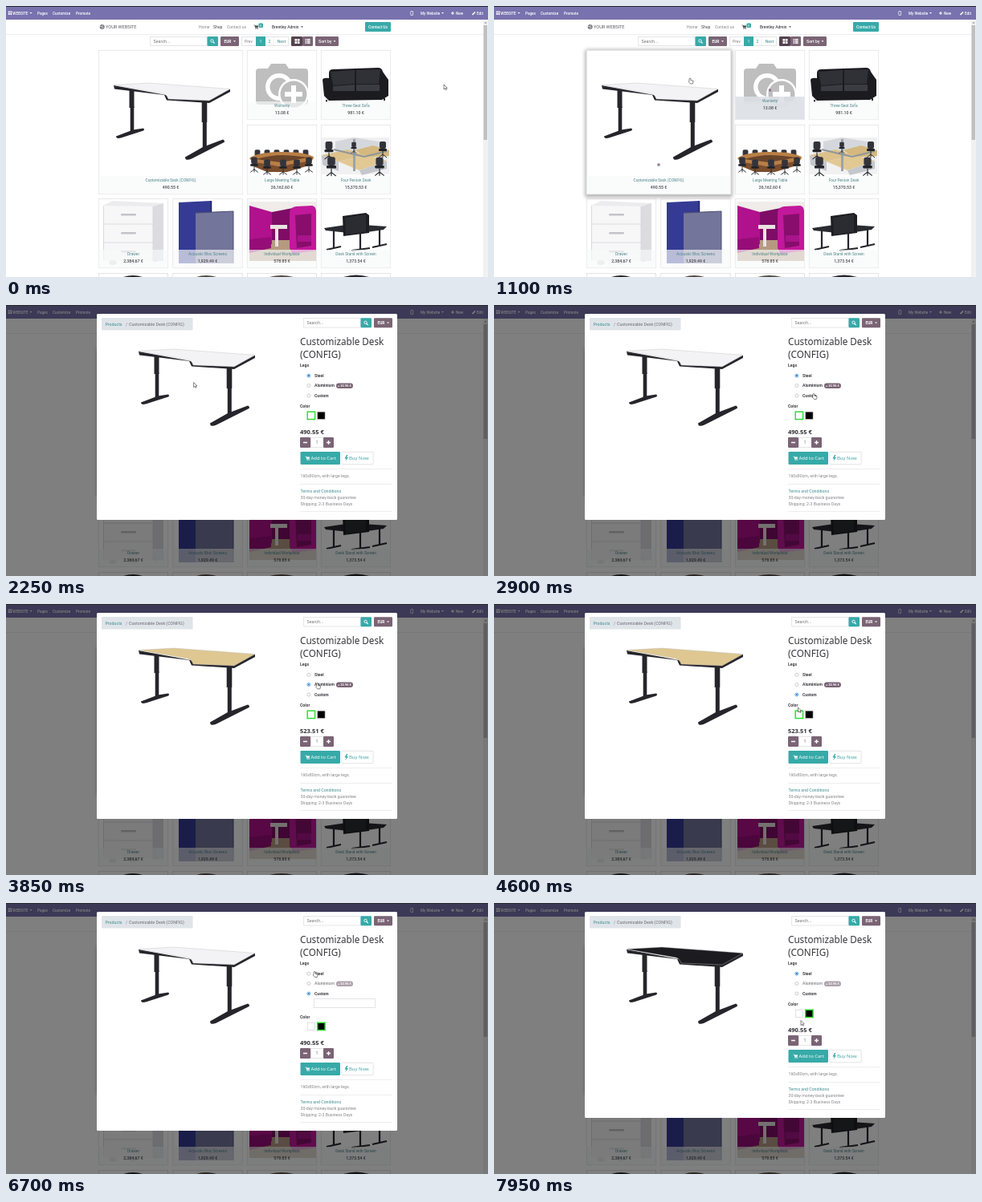
Write an HTML page that moves like this. It is 600 by 338 pixels and loops after 8 s.

```html
<!DOCTYPE html>
<html lang="en">
<head>
<meta charset="utf-8">
<title>Shop product configurator</title>
<style>
html, body { margin: 0; width: 100%; height: 100%; overflow: hidden; background: #fff; }
svg { display: block; width: 100vw; height: 100vh; }
text { font-family: Roboto, sans-serif; white-space: pre; }
.head { font-family: "Noto Sans", "Open Sans", sans-serif; }
</style>
</head>
<body>
<svg id="stage" viewBox="0 0 600 338"></svg>
<script>
const TEAL = '#37aaa8', PLUM = '#7a6475', INK = '#26252b', LINE = '#e4e3e6', GREY = '#85858a';
const $ = id => document.getElementById(id);

// Drawing helpers
const rect = (x, y, w, h, fill, more = '') => `<rect x="${x}" y="${y}" width="${w}" height="${h}" fill="${fill}" ${more}/>`;
const box = (x, y, w, h, more = '') => rect(x + .3, y + .3, w - .6, h - .6, '#fff', `stroke="#d2d2d6" stroke-width=".6" ${more}`);
const path = (d, fill, more = '') => `<path d="${d}" fill="${fill}" ${more}/>`;
const line = (d, color, width, more = '') => path(d, 'none', `stroke="${color}" stroke-width="${width}" ${more}`);
const oval = (x, y, rx, ry, fill, more = '') => `<ellipse cx="${x}" cy="${y}" rx="${rx}" ry="${ry}" fill="${fill}" ${more}/>`;
const text = (x, y, size, str, fill, more = '') => `<text x="${x}" y="${y}" font-size="${size}" fill="${fill}" ${more}>${str}</text>`;
const group = (id, content, more = '') => `<g id="${id}" ${more}>${content}</g>`;
const MID = 'text-anchor="middle"', BOLD = 'font-weight="700"', SEMI = 'font-weight="500"', ROUND = 'rx="1.2"';
const caret = (x, y, fill) => path(`M${x} ${y}h3l-1.5 1.7z`, fill);
const lens = (x, y) => oval(x, y, 1.7, 1.7, 'none', 'stroke="#fff" stroke-width=".9"') + line(`M${x + 1.2} ${y + 1.2}l2 2`, '#fff', 1.1);
const cart = (x, y, fill) => line(`M${x - 3} ${y - 2}h1.2l1 3.2h3`, fill, .7) + path(`M${x - 1.7} ${y - 1.5}h4.4l-.7 2.2h-3.2z`, fill) +
  oval(x - .5, y + 2.2, .6, .6, fill) + oval(x + 1.8, y + 2.2, .6, .6, fill);

const search = (x, y) => box(x, y, 71, 12) + text(x + 4, y + 7.8, 5.4, 'Search...', '#77777c') +
  rect(x + 71, y, 13.5, 12, TEAL, ROUND) + lens(x + 77, y + 5.5) +
  rect(x + 87.5, y, 23, 12, PLUM, ROUND) + text(x + 92, y + 7.8, 4.8, 'EUR', '#fff', BOLD) + caret(x + 103.5, y + 5.3, '#fff');

// Desk; the top takes the chosen finish
const desk = (id, top) => group(id,
  line('M187.5 64V86', INK, 6) + line('M188 84V115', INK, 4.6) + line('M278 76V104', INK, 6.6) + line('M278.3 100V137', INK, 5) +
  path('M168 121.5L189 113.5 202 111.5Q204 113 202 114.5L174 123.5Q168 125 168 121.5z', INK) +
  path('M254 147.5L276 135 301 125.5Q304 127 302.5 129L262 149.5Q254 153 254 147.5z', INK) +
  path('M165 58L166 62.5 228 70 231 76.5 284 80 310 66V63L230 70z', INK) +
  path('M165 57.5L209 55 310 62.5 284 77 233 75Q231 69 226 68z', top, 'class="top" stroke="#bbb" stroke-width=".4"'));

const chair = (x, y, s = 1) => `<g transform="translate(${x} ${y}) scale(${s})">` +
  rect(-4, -9, 8, 9, '#33343b', 'rx="2"') + rect(-5, 0, 10, 3, '#222329', 'rx="1"') +
  line('M0 3V8M-5 11L0 7 5 11M0 7V11', '#2c2d33', 1) + '</g>';

const camera = path('M311 82Q311 78 315 78H326L330 72H348L352 78H372Q376 78 376 82V119Q376 123 372 123H315Q311 123 311 119z', '#bebebf') +
  oval(340, 101, 17, 17, '#fff') + oval(340, 101, 11.5, 11.5, '#bebebf') + oval(358, 110, 19, 19, '#fff') + oval(358, 110, 16.5, 16.5, '#bebebf') +
  path('M355 99h6v8h8v6h-8v8h-6v-8h-8v-6h8z', '#fff');

const sofa = path('M402 84Q402 79 407 79L463 77Q468 77 469 82L476 92V112L468 117 402 118 396 112 394 92Q395 89 402 90z', '#1b1b20') +
  path('M404 82L434 80V97L407 99zM436 80L466 79 464 97H436z', '#303037') +
  path('M407 100L434 98V106H407zM436 98L465 98V106H436z', '#3b3b42') + line('M399 117v3M471 115v3', '#222', 2);

const meeting = [313, 325, 337, 349, 361, 373].map(x => chair(x, 187, .85)).join('') +
  path('M303 190Q310 183 340 182T383 188Q384 193 373 196L340 200Q308 198 303 190z', '#b97f46') +
  path('M311 191Q330 186 343 186T376 189L342 195z', '#6a452a') + path('M306 194L340 200 380 193V198L350 207H325L308 200z', '#7b4e2d') +
  [309, 325, 345, 362, 377].map((x, i) => chair(x, 200 - (i == 0 || i == 4) * 3, .95)).join('');

const fourDesk = rect(393, 164, 84, 46, '#f1f1f2') + path('M410 169L433 164 470 170V188L434 180 410 186z', '#d4d8dc') +
  path('M393 186L425 179 448 186 414 194z', '#dcc18c') + path('M434 180L457 174 477 180V187L450 189z', '#d4b87f') +
  path('M414 194L448 186 474 193 440 205z', '#e2c893') + path('M440 205L474 193V203L443 211zM393 186L414 194V206L394 198z', '#c4c8cc') +
  rect(432, 166, 3, 40, '#9ca3a9') + line('M408 179L446 188 474 181', '#8e969c', 2) +
  chair(402, 179, 1.1) + chair(405, 199, 1.2) + chair(469, 178, 1) + chair(465, 199, 1.15) + chair(433, 176, .7);

const drawer = path('M121 249L133 243 196 246V318L131 318 121 306z', '#ececee') + path('M121 249L183 250V318H122z', '#f7f7f8') +
  path('M183 250L196 246V318H183z', '#dcdce0') + line('M121.500 249V316M122 272H183M122 295H183M183 250V318', '#cfcfd4', .7) +
  [260, 283, 306].map(y => rect(143, y - 1, 19, 2.5, '#c3c3c9', ROUND)).join('') +
  oval(133, 320, 5, 3, '#d8d8dc') + oval(158, 319, 6, 3, '#d8d8dc') + oval(186, 316, 4, 3, '#d8d8dc');

const screens = path('M215 245L255 243V321H215z', '#353b94') + line('M255.500 243V321', '#20245f', 1.5) +
  path('M236 258L283 256V321H236z', '#73759b') + line('M236 258L283 256V321', '#4a4c70', 1);

const workplace = rect(303, 244, 83, 74, '#efece9') + path('M303 292H386V318H303z', '#b69a80') +
  path('M303 249L331 257V297L303 303z', '#b1118c') + path('M331 257L357 252V292H331z', '#7f0c66') +
  path('M353 257Q354 251 361 250L381 249Q386 250 386 256V305L357 309 353 302z', '#c2189b') +
  path('M360 261L380 259V299L362 302z', '#870e6c') + path('M329 273H350V278H329zM335 278H339V300H335z', '#e8e3e0') +
  path('M303 291L330 288V302L303 308z', '#970d78') + rect(363, 286, 17, 8, '#a8148a');

const deskStand = path('M396 277L430 272 474 275 470 279 436 284 398 280z', '#2a2b30') +
  path('M419 262L448 258 452 261V283L420 287z', '#1d1e22') + path('M422 264L448 260V282L423 285z', '#2b2c31') +
  line('M408 281V302M441 282V304M465 279V299M399 304L417 300M430 305L453 302M456 301L474 297', INK, 2.2);

// Product card; the info panel slides up while hovered
const card = (id, x, y, size, name, price, image, note = '') => {
  const mid = x + size / 2, end = y + size;
  return rect(x - 2, y - 1, size + 4, size + 5, '#777', `id="${id}-shadow" opacity="0" rx="3" filter="url(#soft)"`) +
    rect(x + .3, y + .3, size - .6, size - .6, '#fff', `stroke="${LINE}" stroke-width=".8"`) + image +
    rect(x + .7, end - 23, size - 1.400, 22.500, '#f8f9fa', 'opacity=".68"') +
    rect(x + .7, end - 29, size - 1.400, 28.500, '#dce1e6', `id="${id}-band" opacity="0"`) +
    group(id + '-info', text(mid, end - 16.2, 4.82, name, '#4c8588', MID) + text(mid, end - 7.2, 5.2, price, '#4b4b50', MID + SEMI)) +
    text(mid, end - 6, 3.9, note, '#606066', MID + ` id="${id}-note" opacity="0"`) +
    group(id + '-cart', rect(-6.5, -6.5, 13, 13, PLUM, ROUND) + cart(0, 0, '#fff'), `data-at="${mid},${end - 37}"`);
};

const header = rect(0, 0, 600, 17, '#7872ae') +
  [0, 2.6].flatMap(dx => [0, 2.6].map(dy => rect(2.8 + dx, 6.5 + dy, 1.9, 1.9, '#fff'))).join('') +
  [[8.3, 'WEBSITE'], [39, 'Pages'], [58, 'Customize'], [87, 'Promote'], [516, 'My Website'], [560, 'New'], [586, 'Edit']]
    .map(([x, s]) => text(x, 10.7, 4.65, s, '#fff', SEMI)).join('') +
  caret(29.500, 8, '#fff') + caret(542, 8, '#fff') + line('M554 9h4M556 7v4', '#fff', 1) + line('M580.500 11L584 7.500', '#fff', 1.7) +
  rect(503.800, 6.5, 2.8, 5, 'none', 'stroke="#fff" stroke-width=".7" rx=".5"') +
  oval(119.7, 26, 3, 3, '#77777b') + line('M117 25l2.500 1 1-2.500M119 28l2.500-1.500', '#fff', .7) +
  text(124, 28, 5.6, 'YOUR WEBSITE', '#59595e') +
  text(240, 27.8, 5, 'Home', GREY) + text(258, 27.8, 5, 'Shop', '#44444a') + text(275, 27.8, 5, 'Contact us', GREY) +
  cart(311.500, 26, '#444') + rect(314.500, 21.500, 5.500, 5.500, TEAL, ROUND) + text(317.2, 25.7, 4, '0', '#fff', MID) +
  text(331, 27.800, 4.9, 'Brentley Admin', '#44444a', SEMI) + caret(367, 25.3, '#555') +
  rect(447, 20, 32, 12, TEAL, ROUND) + text(463, 27.8, 4.9, 'Contact Us', '#fff', MID + SEMI) + rect(0, 35, 595, .7, '#e5e4e8');

const toolbar = search(179.500, 38) + box(293, 38, 59, 12) + rect(311, 38, 12, 12, TEAL) + line('M333 38v12', '#dcdce0', .5) +
  text(302, 45.800, 5.2, 'Prev', GREY, MID) + text(317, 45.800, 5.2, '1', '#fff', MID) + text(328, 45.800, 5.2, '2', '#3f8d90', MID) +
  text(343, 45.800, 5.2, 'Next', '#3f8d90', MID) + rect(355, 38, 14, 12, '#55434f', ROUND) + rect(369, 38, 13, 12, PLUM, ROUND) +
  [359.500, 362.800].map(x => rect(x, 41, 2.7, 2.7, '#fff') + rect(x, 44.300, 2.7, 2.7, '#fff')).join('') +
  [41, 43.200, 45.400].map(y => rect(372.500, y, 1.4, 1.5, '#fff') + rect(374.600, y, 4, 1.5, '#fff')).join('') +
  rect(385, 38, 29, 12, PLUM, ROUND) + text(389, 45.800, 5.2, 'Sort by', '#fff', SEMI) + caret(407.500, 43.300, '#fff');

const nextRow = [115, 207.500, 300, 392].map(x => box(x, 333, 87, 20)).join('') +
  path('M146 338Q158 334 170 338zM420 338Q436 333 452 338z', INK) + path('M237 338Q248 334 262 338zM328 338Q343 334 358 338z', '#554a44');

const page = rect(0, 0, 600, 338, '#fff') + header + toolbar +
  card('sofa', 392, 55, 87, 'Three-Seat Sofa', '981.10 €', sofa) +
  card('table', 300, 148, 87, 'Large Meeting Table', '26,162.60 €', meeting) +
  card('four', 392, 148, 87, 'Four Person Desk', '15,370.53 €', fourDesk) +
  card('drawer', 115, 240, 87, 'Drawer', '2,384.67 €', drawer) +
  card('screens', 207.500, 240, 87, 'Acoustic Bloc Screens', '1,929.49 €', screens) +
  card('work', 300, 240, 87, 'Individual Workplace', '578.85 €', workplace) +
  card('stand', 392, 240, 87, 'Desk Stand with Screen', '1,373.54 €', deskStand) +
  card('warranty', 300, 55, 87, 'Warranty', '13.08 €', camera) +
  card('desk', 115, 55, 180, 'Customizable Desk (CONFIG)', '490.55 €',
    `<g transform="translate(-31 41)">${desk('bigDesk', '#f3f3f5')}</g>`, '160x80cm, with large legs.') + nextRow +
  rect(594, 17, 6, 321, '#f1f1f2') + path('M595.500 21.500h3l-1.500-1.800z', '#888') + rect(594.500, 24, 4.500, 143, '#c0c0c3');

const radio = (i, y, label) => oval(376.800, y, 2, 2, '#fff', `id="ring${i}" stroke="#aaa" stroke-width=".6"`) +
  oval(376.800, y, 1.1, 1.1, '#1477d4', `id="dot${i}"`) + text(384, y + 1.900, 5.1, label, '#3c3c41', BOLD + ` id="label${i}"`);
const rule = y => rect(366, y, 115, .6, '#e3e3e6');

const modalLower = text(366, 127.700, 5.1, 'Color', '#3c3c41', BOLD) +
  rect(375.200, 133.200, 9.400, 9.400, '#fff', 'id="white"') + rect(387.700, 133.200, 9.400, 9.400, '#000', 'id="black"') +
  text(366, 160.500, 7.5, '490.55 €', '#2d2d32', BOLD + ' class="head" id="price"') +
  box(379, 165, 17, 13) + rect(366, 165, 13, 13, PLUM, ROUND) + rect(395, 165, 13, 13, PLUM, ROUND) +
  line('M370 171.500h5M399 171.500h5M401.500 169v5', '#fff', 1.3) + text(387, 173.400, 5.2, '1', '#66666b', MID) +
  rect(366.500, 183, 49.500, 16, TEAL, ROUND) + cart(375.500, 191, '#fff') + text(379.500, 193.200, 5.9, 'Add to Cart', '#fff', 'class="head"') +
  box(417.500, 183, 40, 16, ROUND) + path('M424 187l-2.500 4.500h2l-1 3.500 3.500-5h-2l1.500-3z', TEAL) +
  text(427, 193.200, 5.9, 'Buy Now', '#43a3a3', 'class="head"') + rule(204) +
  text(366.500, 215, 5.2, '160x80cm, with large legs.', GREY) + rule(223) +
  text(366.500, 234, 5.2, 'Terms and Conditions', '#3f8d90') + text(366.500, 242, 5.2, '30-day money-back guarantee', GREY) +
  text(366.500, 250, 5.2, 'Shipping: 2-3 Business Days', GREY) + rule(257);

const modal = rect(0, 1, 600, 337, '#000', 'opacity=".5"') + rect(113, 11, 374, 257, '#fff', 'id="sheet" rx="1.5"') +
  rect(119, 16, 113.500, 15.500, '#dfe4e9', ROUND) + text(123.500, 25.700, 5.25, 'Products', '#3f8d90') + text(149, 25.700, 5.25, '/', GREY) +
  text(153, 25.700, 5.28, 'Customizable Desk (CONFIG)', '#6a6a70') + search(370.500, 16.300) + desk('modalDesk', '#f3f3f5') +
  text(366, 50, 11.700, 'Customizable Desk', '#35353a', 'class="head"') + text(366, 66, 11.700, '(CONFIG)', '#35353a', 'class="head"') +
  text(366, 76.700, 5.1, 'Legs', '#3c3c41', BOLD) +
  radio(0, 88.200, 'Steel') + radio(1, 100.500, 'Aluminium') + radio(2, 113, 'Custom') +
  group('badge', rect(411, 97.500, 21, 6.400, PLUM, 'rx="3.2"') + text(421.500, 102.200, 4, '+ 32.96 €', '#fff', MID + BOLD)) +
  box(383, 119, 77, 12, 'id="customField"') + group('lower', modalLower);

const arrow = path('M0 0V6L1.500 4.700 2.500 6.700 3.400 6.200 2.500 4.400H4.300z', '#fff', 'stroke="#333" stroke-width=".6"');
const hand = path('M1 0Q2 0 2 1V2.700L5 3.400V5L4.300 7H1.500L-.8 4.300 0 3.800V1Q0 0 1 0z', '#fff', 'stroke="#333" stroke-width=".6"');

$('stage').innerHTML = '<defs><filter id="soft"><feGaussianBlur stdDeviation="2.2"/></filter></defs>' + page +
  group('modal', modal) + rect(0, 0, 600, 1, '#2b2b30') + group('cursor', group('arrow', arrow) + group('hand', hand));

// Timeline
const cursorKeys = [[100, 545, 98], [450, 525, 98], [700, 440, 96], [850, 378, 93], [1000, 285, 90], [1100, 243, 90], [1500, 234, 95],
  [2200, 233.500, 96.500], [2400, 234, 97], [2900, 397, 110.500], [3250, 391, 101], [3400, 388, 98.500], [4050, 386, 99], [4400, 384, 110],
  [4600, 378.500, 129], [5000, 388, 150], [5800, 391, 152], [6100, 391, 152], [6550, 383, 85.500], [7050, 383, 85.500],
  [7400, 386, 110], [7950, 382, 146.500]];
const hover = {
  sofa: { lift: [[630, 0], [730, 1], [850, 1], [1000, 0]], cart: [[630, 0], [800, .5], [950, 0]] },
  warranty: { lift: [[850, 0], [980, 1], [1100, 1], [1300, 0]], cart: [[850, 0], [1000, .35], [1100, .23], [1200, 0]] },
  desk: { lift: [[1100, 0], [1350, 1]], cart: [[1030, 0], [1100, .23], [1350, 1]], shadow: [[990, 0], [1100, .5]] }
};
const handTimes = [[630, 2250], [2700, 4520], [5250, 6180], [6450, 7150]];

function at(keys, t, column = 1) {
  const i = keys.findIndex(key => key[0] > t);
  if (i < 1) return keys[i ? keys.length - 1 : 0][column];
  const a = keys[i - 1], b = keys[i], u = (t - a[0]) / (b[0] - a[0]);
  return a[column] + (b[column] - a[column]) * u * u * (3 - 2 * u);
}
const set = (id, attrs) => { for (const key in attrs) $(id).setAttribute(key, attrs[key]); };
const show = (id, on) => set(id, { visibility: on ? 'inherit' : 'hidden' });

function drawHover(id, t) {
  const keys = hover[id], lift = keys ? at(keys.lift, t) : 0, scale = keys ? at(keys.cart, t) : 0;
  set(id + '-band', { opacity: lift * .88 });
  set(id + '-note', { opacity: lift });
  set(id + '-info', { transform: `translate(0 ${-6 * lift})` });
  set(id + '-cart', { transform: `translate(${$(id + '-cart').dataset.at}) scale(${scale})` });
  set(id + '-shadow', { opacity: keys?.shadow ? at(keys.shadow, t) : 0 });
}

function drawModal(t) {
  const chosen = t < 3400 ? 0 : t < 4500 ? 1 : t < 6800 ? 2 : 0;
  const wood = t >= 3550 && t < 4700, custom = t >= 4700 && t < 6850, black = t >= 5950;
  const finish = wood ? '#dfc792' : t >= 6850 ? '#1c1c20' : '#f3f3f5';
  show('modal', t >= 2250);
  set('sheet', { height: custom ? 273 : 257 });
  set('lower', { transform: `translate(0 ${custom ? 16 : 0})` });
  show('customField', custom);
  $('modalDesk').querySelector('.top').setAttribute('fill', finish);
  $('price').textContent = wood ? '523.51 €' : '490.55 €';
  for (let i = 0; i < 3; i++) {
    show('dot' + i, i === chosen);
    set('ring' + i, { stroke: i === chosen ? '#1477d4' : '#aaa' });
  }
  set('label1', { opacity: black ? .55 : 1 });
  set('badge', { opacity: black ? .6 : 1 });
  const mark = on => ({ stroke: on ? '#35dc35' : '#c9c9cc', 'stroke-width': on ? 1.5 : .6 });
  set('white', mark(!black));
  set('black', mark(black));
}

function frame() {
  const t = performance.now() % 8000;
  Object.keys(hover).forEach(id => drawHover(id, t));
  drawModal(t);
  const pointing = handTimes.some(([from, to]) => t >= from && t < to);
  show('hand', pointing);
  show('arrow', !pointing);
  set('cursor', { transform: `translate(${at(cursorKeys, t, 1)} ${at(cursorKeys, t, 2)})` });
  requestAnimationFrame(frame);
}
['table', 'four', 'drawer', 'screens', 'work', 'stand'].forEach(id => drawHover(id, 0));
frame();
</script>
</body>
</html>
```
